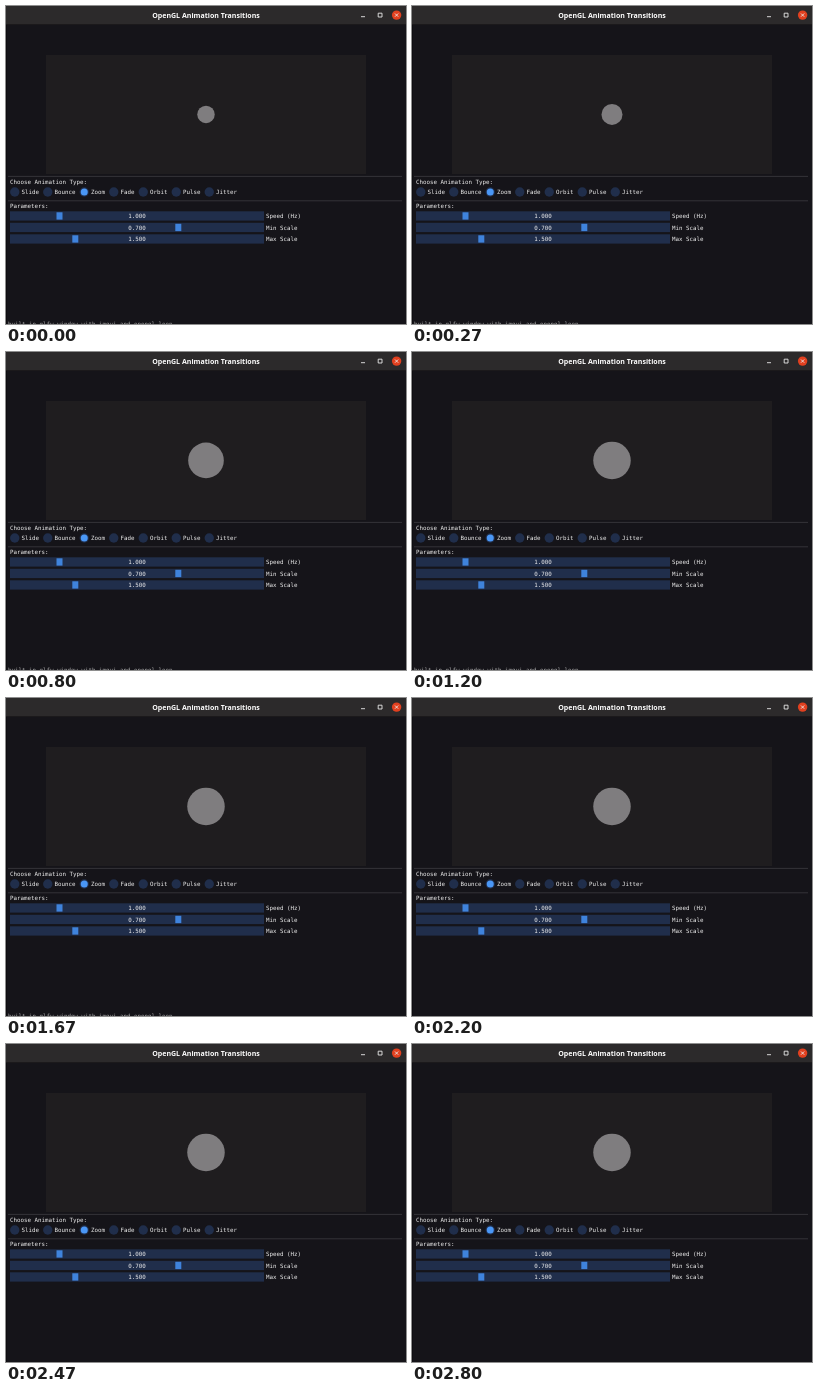
An HTML page for the animation above (2.87 s loop, 400 by 318 pixels).

```html
<!DOCTYPE html>
<html lang="en">
<head>
<meta charset="utf-8">
<title>OpenGL Animation Transitions</title>
<style>
  html, body { margin: 0; width: 100%; height: 100%; overflow: hidden; background: #151419; }
  svg { display: block; width: 100%; height: 100%; }
  text { font: 5.82px "DejaVu Sans Mono", monospace; fill: #f0f0f0; white-space: pre; }
  .title { font: 700 7.06px "Open Sans", "Noto Sans", sans-serif; fill: #fff; }
  .middle { text-anchor: middle; }
  .frame { fill: #202e4b; }
  .grab { fill: #3f83dc; }
  .dot { fill: #4a97f6; }
  .rule { stroke: #3b3a40; stroke-width: .8; }
  .icon { fill: none; stroke: #e8e8e8; stroke-width: .9; }
</style>
</head>
<body>
<svg viewBox="0 0 400 318">
  <rect width="400" height="318" fill="#151419"/>
  <rect width="400" height="18.5" fill="#2c2a2b"/>
  <rect y="18" width="400" height="1" fill="#1b191b"/>
  <rect y="19" width="1" height="299" fill="#0e0d11"/>
  <text class="title middle" x="200" y="12">OpenGL Animation Transitions</text>
  <path class="icon" d="M355 10.7h4M372.2 7.2h3.8v3.8h-3.8z"/>
  <circle cx="390.6" cy="9.1" r="4.7" fill="#e2401f"/>
  <path class="icon" d="M389 7.5l3.2 3.2m0-3.2l-3.2 3.2"/>

  <rect x="40" y="49" width="320" height="119" fill="#1f1d1f"/>
  <circle id="ball" cx="200" cy="108.4" r="8.8" fill="#7f7d7f"/>

  <path class="rule" d="M2 170.4H396M2 194.8H396"/>
  <text x="4" y="178">Choose Animation Type:</text>
  <text x="4" y="202">Parameters:</text>
  <g id="controls"></g>
  <text id="cutoff" x="2" y="319.6" style="fill:#aaa">built in glfw window with imgui and opengl loop</text>
</svg>
<script>
  const LOOP = 2870, STEP = 1000 / 15, CHAR = 3.5;
  const UNIT_RADIUS = 12.5, MIN_SCALE = 0.7, MAX_SCALE = 1.5;
  const controls = document.getElementById('controls');
  const ball = document.getElementById('ball');
  const cutoff = document.getElementById('cutoff');

  function add(tag, attrs, text = '') {
    const node = document.createElementNS(controls.namespaceURI, tag);
    for (const name in attrs) node.setAttribute(name, attrs[name]);
    node.textContent = text;
    controls.append(node);
  }

  let left = 4;
  for (const label of ['Slide', 'Bounce', 'Zoom', 'Fade', 'Orbit', 'Pulse', 'Jitter']) {
    const cx = left + 4.75;
    add('circle', { class: 'frame', cx, cy: 186, r: 4.7 });
    if (label === 'Zoom') add('circle', { class: 'dot', cx, cy: 186, r: 3.5 });
    add('text', { x: left + 11.5, y: 188 }, label);
    left += 15.5 + label.length * CHAR;
  }

  const sliders = [['Speed (Hz)', '1.000', 50.5], ['Min Scale', '0.700', 169.3], ['Max Scale', '1.500', 66.3]];
  sliders.forEach(([label, value, x], row) => {
    const y = 205.3 + row * 11.5;
    add('rect', { class: 'frame', x: 4, y, width: 254, height: 9.3 });
    add('rect', { class: 'grab', x, y: y + 1, width: 6, height: 7.3 });
    add('text', { class: 'middle', x: 131, y: y + 6.8 }, value);
    add('text', { x: 260, y: y + 6.8 }, label);
  });

  // The zoom eases up for one second, then holds, at 15 pictures a second.
  function draw() {
    const time = performance.now() % LOOP;
    const stepped = Math.floor((time + 4) / STEP) * STEP;
    const phase = Math.min(1, (stepped + 12) / 1012);
    const ease = (1 - Math.cos(Math.PI * phase)) / 2;
    const scale = MIN_SCALE + (MAX_SCALE - MIN_SCALE) * ease;
    ball.setAttribute('r', UNIT_RADIUS * scale);
    cutoff.setAttribute('visibility', time < 2000 ? 'visible' : 'hidden');
    requestAnimationFrame(draw);
  }
  draw();
</script>
</body>
</html>
```
